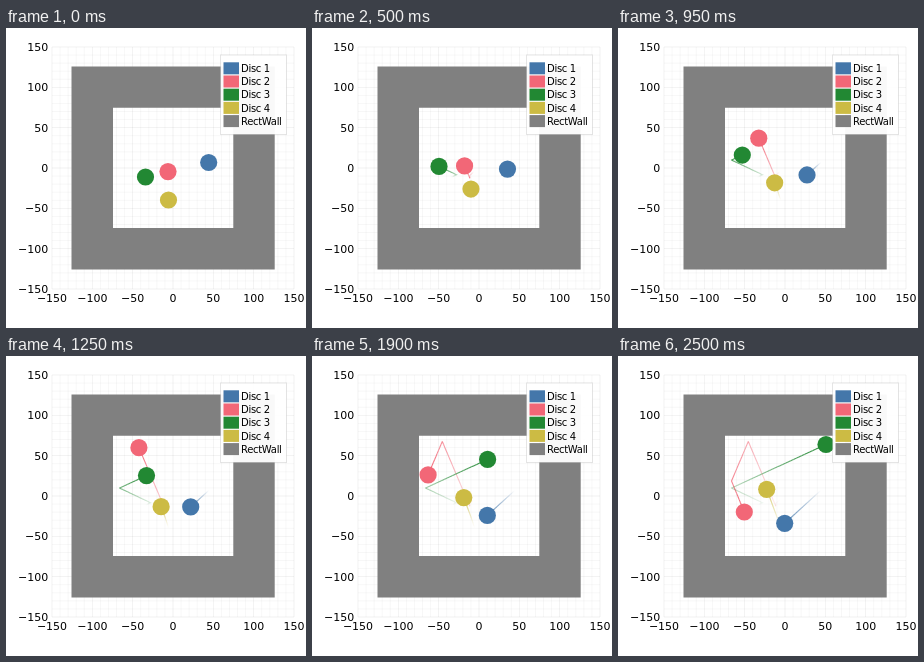
An HTML page that plays this animation: 300 by 300 pixels, repeating every 2550 ms.

```html
<!DOCTYPE html>
<html lang="en">
<head>
<meta charset="utf-8">
<title>Bouncing discs</title>
<style>
  html, body { margin: 0; width: 100%; height: 100%; overflow: hidden; background: #fff; }
  svg { display: block; width: 100vw; height: 100vh; }
  text { font-family: "DejaVu Sans", sans-serif; font-size: 11px; fill: #000; }
  .key { font-size: 10px; letter-spacing: -0.3px; }
</style>
</head>
<body>
<svg id="stage" viewBox="0 0 300 300"></svg>
<script>
const LOOP = 2550, STEP = 50, RADIUS = 8.6, WALL = '#808080';

// Each path is a list of [ms, x, y] with straight, even motion between the bounces.
const discs = [
  { name: 'Disc 1', color: '#4477aa', path: [[0, 202.7, 134.5], [2500, 166.7, 167.3]] },
  { name: 'Disc 2', color: '#f26777', path: [[0, 162, 143.6], [175, 157.7, 147.4], [300, 157.8, 150.2],
    [1350, 130.3, 85.5], [2000, 113.5, 125], [2500, 126.3, 156]] },
  { name: 'Disc 3', color: '#228833', path: [[0, 139.5, 149], [175, 144.6, 146.8], [750, 113.5, 132], [2500, 208, 88.5]] },
  { name: 'Disc 4', color: '#ccbb44', path: [[0, 162.5, 172], [300, 160, 163.8], [2500, 148.7, 133.3]] }
];

const svg = document.getElementById('stage');

function add(tag, attrs, content) {
  const el = document.createElementNS('http://www.w3.org/2000/svg', tag);
  for (const key in attrs) el.setAttribute(key, attrs[key]);
  if (content) el.textContent = content;
  svg.appendChild(el);
  return el;
}

const px = v => 167 + v * 0.8067;
const py = v => 140 - v * 0.8067;

function position(path, t) {
  let i = 1;
  while (i < path.length - 1 && path[i][0] < t) i++;
  const [t0, x0, y0] = path[i - 1], [t1, x1, y1] = path[i];
  const k = (t - t0) / (t1 - t0);
  return [x0 + (x1 - x0) * k, y0 + (y1 - y0) * k];
}

function drawAxes() {
  for (let v = -150; v <= 150; v += 10) {
    const major = v % 50 === 0;
    const style = { stroke: '#000', 'stroke-width': 0.6, opacity: major ? 0.09 : 0.05 };
    add('line', { x1: px(v), x2: px(v), y1: 19, y2: 261, ...style });
    add('line', { x1: 46, x2: 288, y1: py(v), y2: py(v), ...style });
    if (!major) continue;
    const label = String(v).replace('-', '\u2212');
    add('text', { x: px(v), y: 274, 'text-anchor': 'middle' }, label);
    add('text', { x: 42.3, y: py(v) + 4, 'text-anchor': 'end' }, label);
  }
}

function drawLegend() {
  add('rect', { x: 214.5, y: 27, width: 66, height: 79.5, fill: '#fff', 'fill-opacity': 0.95,
    stroke: '#000', 'stroke-opacity': 0.1 });
  [...discs, { name: 'RectWall', color: WALL }].forEach(({ name, color }, i) => {
    const y = 40.3 + i * 13.2;
    add('rect', { x: 217.5, y: y - 6, width: 15.5, height: 12, fill: color });
    add('text', { x: 235, y: y + 3.7, class: 'key' }, name);
  });
}

drawAxes();

const count = LOOP / STEP;
for (const d of discs) {
  d.trail = [];
  for (let i = 1; i < count; i++) {
    const times = [i - 1, i - 0.5, i].map(n => position(d.path, n * STEP).join());
    d.trail.push(add('polyline', { points: times.join(' '), fill: 'none', stroke: d.color, 'stroke-width': 1.1 }));
  }
}
for (const d of discs) d.dot = add('circle', { r: RADIUS, fill: d.color });

add('path', { d: 'M65.5 38.5H268.7V241.5H65.5ZM107 79.8V200H227.3V79.8Z', fill: WALL, 'fill-rule': 'evenodd' });
drawLegend();

function render(now) {
  const n = Math.floor((now % LOOP) / STEP);
  for (const d of discs) {
    const [x, y] = position(d.path, n * STEP);
    d.dot.setAttribute('cx', x);
    d.dot.setAttribute('cy', y);
    d.trail.forEach((seg, i) => seg.setAttribute('opacity', i < n ? (i + 0.5) / n : 0));
  }
}

const start = performance.now();
function tick() {
  render(performance.now() - start);
  requestAnimationFrame(tick);
}
tick();
</script>
</body>
</html>
```
